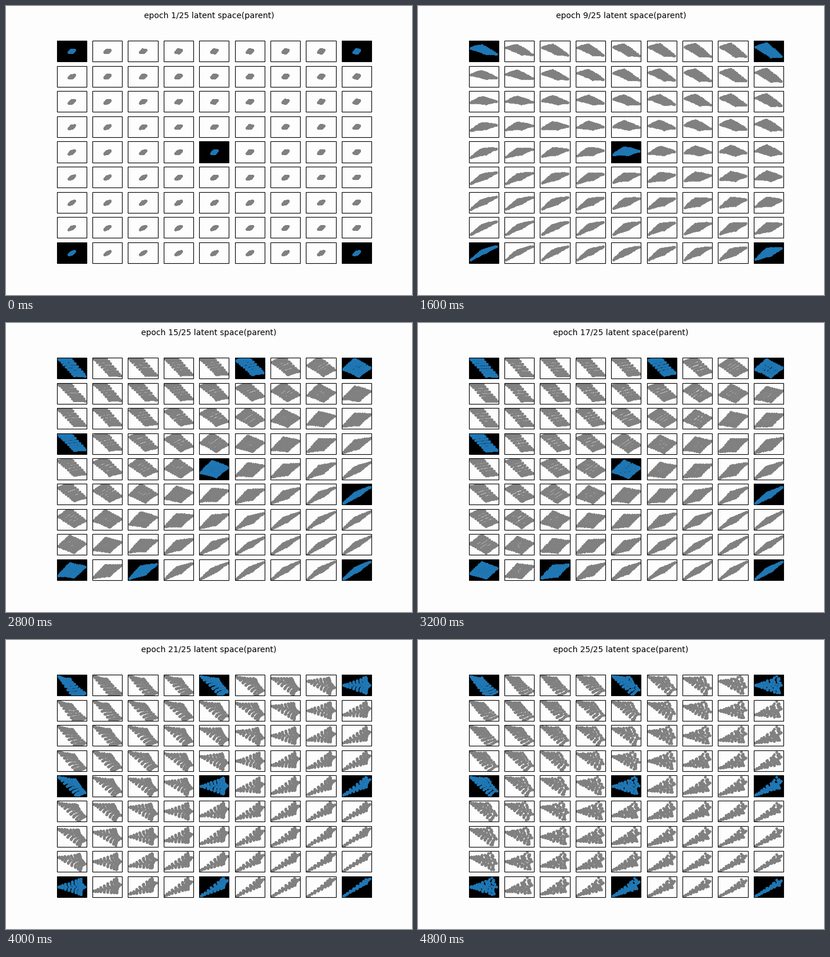
Write a matplotlib script that moves like this. It is 700 px wide and 500 px high and loops after 5 s.

```python
import numpy as np
import matplotlib.pyplot as plt
from matplotlib.animation import FuncAnimation
from matplotlib.patches import Rectangle

W, H, DPI = 700, 500, 100
N, EPOCHS = 9, 25
PAPER, GRAY, BLUE = "#fdfdfd", "#808080", "#1f77b4"

# Panel size with matplotlib's default margins and 20 % gaps.
LEFT, TOP = 0.125 * W, 0.12 * H
PANEL_W = 0.775 * W / (N + 0.2 * (N - 1))
PANEL_H = 0.77 * H / (N + 0.2 * (N - 1))

# Latent position of each panel, and the index of each dot in its sheet.
COL, ROW = (g[..., None] for g in np.meshgrid(*[np.linspace(-1, 1, N)] * 2))
GRID = np.linspace(0, 1, 9)
JITTER = np.random.default_rng(4).normal(size=(2, GRID.size**2))


def sheet_grid(epoch):
    """Dot coordinates s, t: first even, then wide in the middle, then at the end."""
    even = GRID ** np.interp(epoch, [19, 25], [1, 1.3])
    eased = even**2 * (3 - 2 * even)
    mix = np.interp(epoch, [9, 19, 25], [0, 0.6, 0])
    s, t = np.meshgrid(*[even + mix * (eased - even)] * 2)
    return s.ravel(), t.ravel()


def diamond(s, t, reach, left, right, height, bow):
    """A sheet hung between a left and a right tip, arched upwards by bow."""
    along, across = (s + t) / 2, t - s
    x = 0.5 + reach * (2 * along - 1) + 0.07 * across
    y = (left + (right - left) * along + height * across
         - 4 * bow * along * (1 - along))
    return x + 0 * y, y


def fan(s, t, reach, left, right, spread, noise):
    """Rays opening from an apex on the left."""
    radius = ((s**4 + t**4) / 2) ** 0.25
    angle = (t - s) / np.maximum(np.maximum(s, t), 1e-6)
    x = 0.5 + reach * (2 * radius - 1) + noise * radius * JITTER[0]
    y = left + radius * (right - left + spread * angle + 1.5 * noise * JITTER[1])
    return x + 0 * y, y


def sheets_at(epoch):
    """Dot positions of all panels, as fractions of the panel, y down."""
    def track(epochs, values):
        return np.interp(epoch, epochs, values)

    # The tilt of a sheet follows one diagonal of the latent space.
    tilt = (ROW + COL * track([5, 9, 15, 19], [-0.5, -0.35, 0.85, 1])
            + track([9, 15, 21], [0.1, 0.2, 0]))
    rise, fall = np.maximum(tilt, 0), np.maximum(-tilt, 0)
    learn = [5, 9, 15]
    reach = track(learn, [0.4, 0.43, 0.455])
    left = (track(learn, [0.78, 0.57, 0.5])
            + track(learn, [0.1, 0.27, 0.45]) * np.tanh(2 * tilt))
    right = (track(learn, [0.23, 0.48, 0.5])
             - track([*learn, 21, 25], [0.05, 0.32, 0.4, 0.4, 0.3]) * np.tanh(tilt))

    early = track([5, 9], [0.24, 0.17]) + 0.06 * COL - 0.08 * ROW
    late = np.maximum(0.43 - track([15, 21], [0.32, 0.17]) * rise, 0.06)
    height = early + track([9, 15], [0, 1]) * (late - early)

    opening = track([17, 21], [0, 1])
    bow = track([5, 9, 15, 19], [0, 0.08, 0.05, 0]) - 0.08 * opening * fall
    spread = np.maximum(0.45 - 0.17 * rise, 0.08)
    noise = track([20, 25], [0, 0.03])

    s, t = sheet_grid(epoch)
    kite = np.stack(diamond(s, t, reach, left, right, height, bow), -1)
    rays = np.stack(fan(s, t, reach, left, right, spread, noise), -1)
    mix = opening * np.clip(1 - fall / 2, 0, 1)[..., None]
    points = kite + mix * (rays - kite)
    growth = track([1, 5], [0.24, 1])
    return np.clip(0.5 + growth * (points - 0.5), 0.04, 0.96)


def node_panels(epoch):
    """Corners and centre stay; the edge nodes slide out of the corners."""
    def slide(epochs, cells):
        return int(np.interp(epoch, epochs, cells))

    last, quick = N - 1, slide([9, 15, 19], [0, 3, 4])
    return {
        (0, 0), (0, last), (4, 4), (last, 0), (last, last),
        (0, last - quick), (last - quick, last),
        (slide([9, 15, 21], [0, 3, 4]), 0),
        (last, slide([9, 15, 19, 21], [0, 2, 3, 4])),
    }


fig = plt.figure(figsize=(W / DPI, H / DPI), dpi=DPI, facecolor=PAPER)
ax = fig.add_axes([0, 0, 1, 1])
ax.set(xlim=(0, W), ylim=(H, 0))
ax.axis("off")
title = fig.suptitle("", fontsize=10)

panels = {}
for row in range(N):
    for col in range(N):
        corner = (LEFT + 1.2 * PANEL_W * col, TOP + 1.2 * PANEL_H * row)
        back = ax.add_patch(Rectangle(corner, PANEL_W, PANEL_H, lw=0, zorder=1))
        ax.add_patch(Rectangle(corner, PANEL_W, PANEL_H, fill=False,
                               ec="black", lw=0.8, zorder=3))
        dots = ax.scatter([], [], s=4, lw=1.5, zorder=2)
        dots.set_clip_path(back)
        panels[row, col] = corner, back, dots


def draw(frame):
    epoch = frame + 1
    title.set_text(f"epoch {epoch}/{EPOCHS} latent space(parent)")
    sheets, nodes = sheets_at(epoch), node_panels(epoch)
    for cell, (corner, back, dots) in panels.items():
        dots.set_offsets(sheets[cell] * (PANEL_W, PANEL_H) + corner)
        dots.set_color(BLUE if cell in nodes else GRAY)
        back.set_facecolor("black" if cell in nodes else PAPER)


anim = FuncAnimation(fig, draw, frames=EPOCHS, interval=200,
                     repeat=True, repeat_delay=0, init_func=lambda: draw(0))
plt.show()
```
